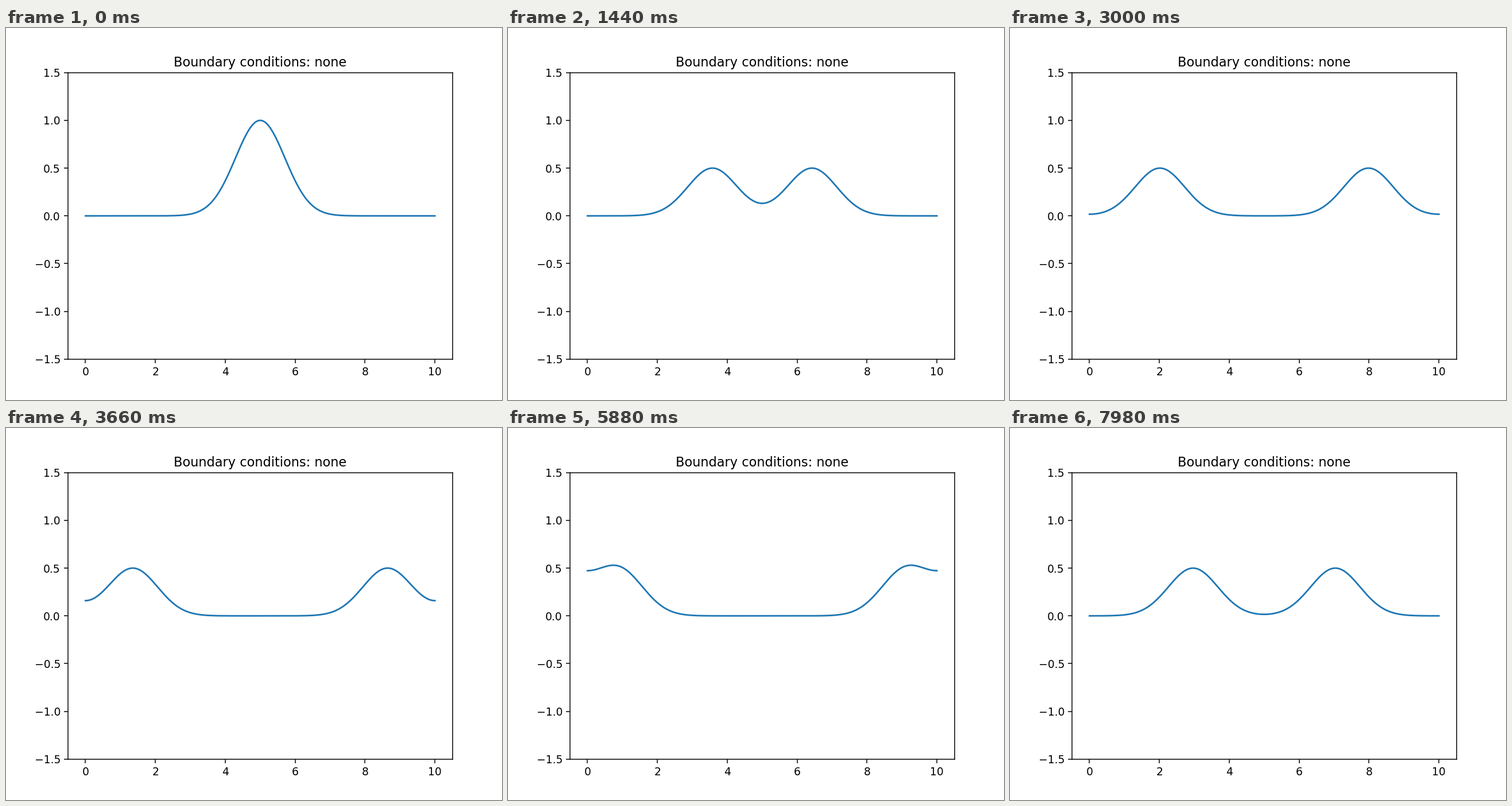
Animation, 864 px wide and 648 px high, one loop 8 s. Source, as a matplotlib script:

```python
import numpy as np
import matplotlib.pyplot as plt
from matplotlib.animation import FuncAnimation

LOOP_MS = 8000
FRAMES = 267
LENGTH = 10.0
CENTRE = LENGTH / 2
STEP = 0.03  # distance a pulse travels per frame

x = np.linspace(0, LENGTH, 1001)


def pulse(s):
    """Initial bump, mirrored at both free ends of the string."""
    s = np.mod(s, 2 * LENGTH)
    s = np.where(s > LENGTH, 2 * LENGTH - s, s)
    return np.exp(-(s - CENTRE) ** 2)


def wave(n):
    # starting from rest costs the scheme half a time step
    d = STEP * max(n - 0.5, 0)
    return 0.5 * (pulse(x - d) + pulse(x + d))


fig, ax = plt.subplots(figsize=(6.4, 4.8), dpi=135)
line, = ax.plot(x, wave(0), color="#1f77b4", lw=1.5)
ax.set_xlim(-0.5, 10.5)
ax.set_ylim(-1.5, 1.5)
ax.set_title("Boundary conditions: none")


def update(n):
    line.set_ydata(wave(n))
    return line,


anim = FuncAnimation(fig, update, frames=FRAMES, interval=LOOP_MS / FRAMES,
                     repeat=True, repeat_delay=0, blit=False)
plt.show()
```
